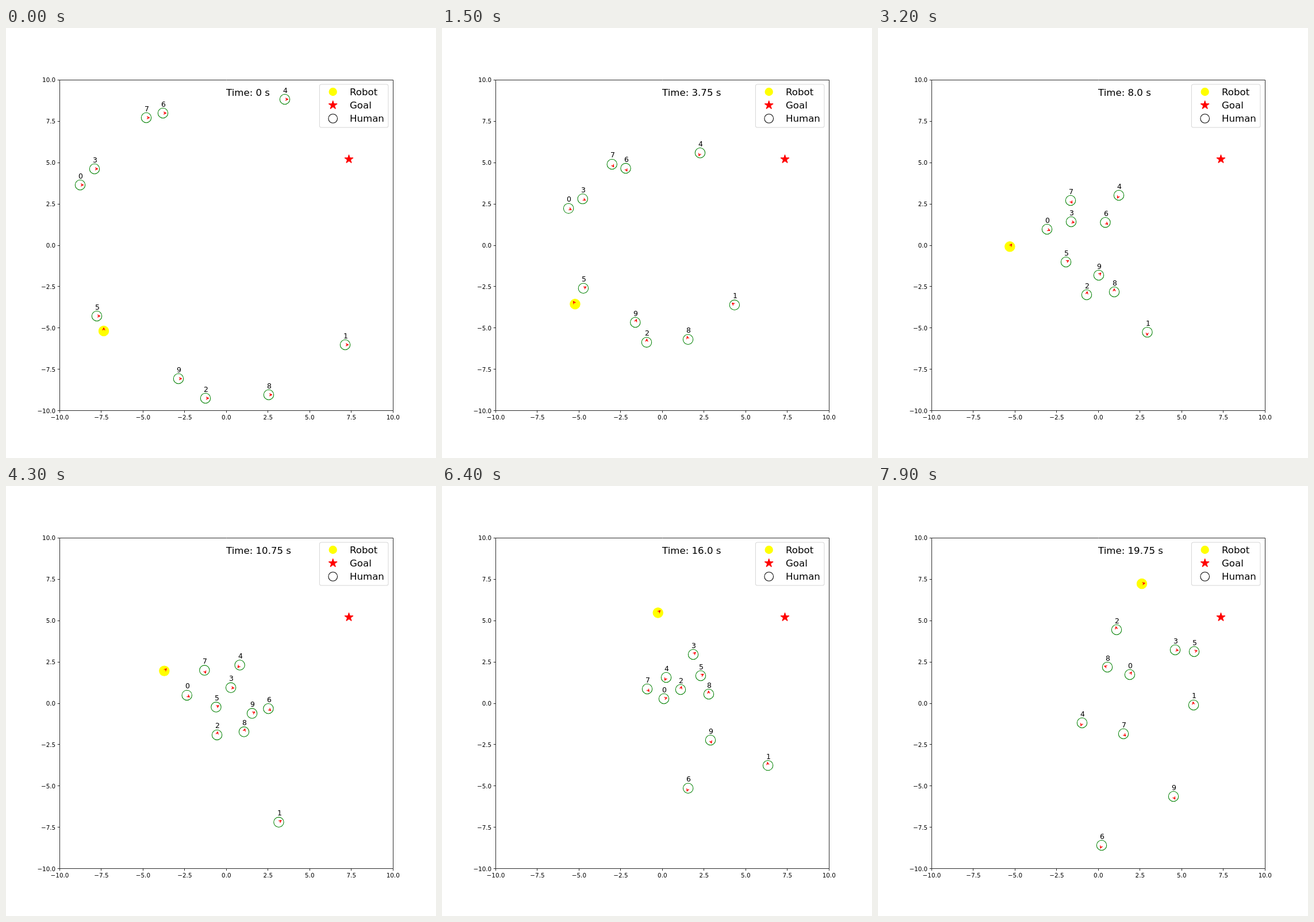
Recreate the animation shown at these times as an HTML page with a canvas. Size 748 by 748 pixels, loop 8 s.

```html
<!DOCTYPE html>
<html lang="en">
<head>
<meta charset="utf-8">
<title>Crowd navigation</title>
<style>
  html, body { margin: 0; width: 100%; height: 100%; overflow: hidden; background: #fff; }
  canvas { display: block; width: 748px; height: 748px; }
</style>
</head>
<body>
<canvas id="stage" width="748" height="748"></canvas>
<script>
const ctx = document.getElementById('stage').getContext('2d');
const STEP_MS = 100, STEPS = 80, LAST = STEPS - 1, DT = 0.25;
const PT = 748 / 720;             // one point in pixels
const TAU = 2 * Math.PI;
const UNIT = 28.985;              // pixels per axis unit
const BEATS = [0, 32, 52, 64, LAST];

const toX = v => 383.35 + UNIT * v;
const toY = v => 378 - 28.79 * v;

// Constant speed along straight legs, arriving at the last step
function walk(...points) {
  const legs = points.slice(1).map(([x, y], i) => {
    const [px, py] = points[i];
    return { px, py, length: Math.hypot(x - px, y - py), heading: Math.atan2(y - py, x - px) };
  });
  const total = legs.reduce((sum, leg) => sum + leg.length, 0);
  return step => {
    let s = total * step / LAST, i = 0;
    while (i < legs.length - 1 && s > legs[i].length) s -= legs[i++].length;
    const { px, py, heading } = legs[i];
    return { x: px + s * Math.cos(heading), y: py + s * Math.sin(heading), heading };
  };
}

// Smooth curve through the values at BEATS; returns value and slope
function spline(values, startSlope) {
  const n = values.length - 1;
  const gap = i => BEATS[i + 1] - BEATS[i];
  const rate = i => (values[i + 1] - values[i]) / gap(i);
  const slopes = [startSlope];
  for (let i = 1; i < n; i++) {
    slopes[i] = (rate(i - 1) * gap(i) + rate(i) * gap(i - 1)) / (gap(i - 1) + gap(i));
  }
  slopes[n] = 2 * rate(n - 1) - slopes[n - 1];
  return t => {
    let i = 0;
    while (i < n - 1 && t >= BEATS[i + 1]) i++;
    const h = gap(i), u = (t - BEATS[i]) / h;
    const a = slopes[i] * h, b = slopes[i + 1] * h, d = values[i + 1] - values[i];
    const c2 = 3 * d - 2 * a - b, c3 = a + b - 2 * d;
    return [values[i] + u * (a + u * (c2 + u * c3)), (a + u * (2 * c2 + 3 * u * c3)) / h];
  };
}

// Sets off for the centre at one unit per second, then weaves through the crowd
function weave(...points) {
  const [x0, y0] = points[0];
  const toCentre = Math.atan2(toY(0) - y0, toX(0) - x0), speed = UNIT * DT;
  const xAt = spline(points.map(p => p[0]), speed * Math.cos(toCentre));
  const yAt = spline(points.map(p => p[1]), speed * Math.sin(toCentre));
  return step => {
    const [x, vx] = xAt(step), [y, vy] = yAt(step);
    return { x, y, heading: Math.atan2(vy, vx) };
  };
}

const robot = walk([170, 527], [244, 499], [202, 436], [225, 386], [270, 327], [418, 178], [459, 170]);

const humans = [
  weave([129, 273], [294, 350], [334, 370], [386, 370], [438, 328]),
  walk([590, 551], [475, 453], [463, 593], [572, 515], [549, 381]),
  weave([347, 644], [363, 464], [378, 407], [415, 354], [415, 250]),
  weave([154, 245], [336, 337], [424, 344], [437, 293], [517, 285]),
  weave([485, 124], [419, 291], [399, 321], [390, 333], [355, 412]),
  weave([158, 501], [327, 407], [397, 365], [450, 330], [550, 288]),
  walk([273, 148], [320, 245], [394, 337], [466, 395], [460, 445], [389, 625]),
  weave([244, 156], [335, 300], [350, 333], [357, 353], [427, 431]),
  weave([457, 638], [411, 459], [427, 404], [464, 362], [399, 315]),
  weave([300, 610], [384, 430], [457, 392], [467, 442], [514, 540])
];

function text(str, x, y, points, align = 'left') {
  ctx.font = `${points * PT}px "DejaVu Sans", sans-serif`;
  ctx.textAlign = align;
  ctx.fillStyle = '#000';
  ctx.fillText(str, x, Math.round(y));
}

function line(x1, y1, x2, y2) {
  ctx.beginPath();
  ctx.moveTo(x1, y1);
  ctx.lineTo(x2, y2);
  ctx.stroke();
}

function circle(x, y, r, stroke, fill) {
  ctx.beginPath();
  ctx.arc(x, y, r, 0, TAU);
  if (fill) { ctx.fillStyle = fill; ctx.fill(); }
  if (stroke) { ctx.strokeStyle = stroke; ctx.lineWidth = PT; ctx.stroke(); }
}

function star(x, y) {
  ctx.beginPath();
  for (let i = 0; i < 10; i++) {
    const r = 7.5 * PT * (i % 2 ? 0.382 : 1), a = i * TAU / 10;
    ctx.lineTo(x + r * Math.sin(a), y - r * Math.cos(a));
  }
  ctx.closePath();
  ctx.lineJoin = 'bevel';
  ctx.lineWidth = PT;
  ctx.fillStyle = ctx.strokeStyle = '#f00';
  ctx.fill();
  ctx.stroke();
}

function arrow(x, y, heading) {
  const tip = 5.6, back = tip - 4 * PT, side = 2 * PT;
  ctx.save();
  ctx.translate(x, y);
  ctx.rotate(heading);
  ctx.strokeStyle = '#f00';
  ctx.lineWidth = PT;
  ctx.lineCap = ctx.lineJoin = 'round';
  ctx.beginPath();
  ctx.moveTo(2 * PT, 0);
  ctx.lineTo(tip, 0);
  ctx.moveTo(back, -side);
  ctx.lineTo(tip, 0);
  ctx.lineTo(back, side);
  ctx.stroke();
  ctx.restore();
}

function axes() {
  ctx.strokeStyle = '#000';
  ctx.lineWidth = 0.8 * PT;
  ctx.strokeRect(93.5, 90.5, 580, 575);
  for (let v = -10; v <= 10; v += 2.5) {
    const label = v.toFixed(1).replace('-', '\u2212');
    const x = Math.floor(toX(v)) + 0.5, y = Math.floor(toY(v)) + 0.5;
    line(x, 665.5, x, 669.3);
    line(89.7, y, 93.5, y);
    text(label, toX(v), 681, 10, 'center');
    text(label, 86.2, toY(v) + 3.8, 10, 'right');
  }
}

function legend() {
  ctx.beginPath();
  ctx.roundRect(545.4, 98, 119.6, 75, 3.3);
  ctx.fillStyle = '#fff';
  ctx.fill();
  ctx.strokeStyle = '#d6d6d6';
  ctx.lineWidth = PT;
  ctx.stroke();
  circle(568.7, 111, 7.2, null, '#ff0');
  star(568.7, 134.2);
  circle(568.7, 157.5, 7.5 * PT, '#000');
  ['Robot', 'Goal', 'Human'].forEach((name, i) => text(name, 598, 116.8 + 23.2 * i, 16));
}

function timeLabel(step) {
  const t = step * DT;
  return step && Number.isInteger(t) ? t.toFixed(1) : String(t);
}

function draw() {
  const step = Math.floor(performance.now() / STEP_MS) % STEPS;
  ctx.fillStyle = '#fff';
  ctx.fillRect(0, 0, 748, 748);

  const r = robot(step);
  circle(r.x, r.y, 8.7, '#ff0', '#ff0');
  star(596.5, 228.3);
  humans.forEach((human, i) => {
    const { x, y, heading } = human(step);
    circle(x, y, 8.7, '#008000');
    arrow(x, y, step ? heading : 0);
    text(i, Math.round(x - 2.9), y - 11.5, 12);
  });
  arrow(r.x, r.y, step ? r.heading : -TAU / 4);

  axes();
  text(`Time: ${timeLabel(step)} s`, 383, 118, 16);
  legend();
  requestAnimationFrame(draw);
}
draw();
</script>
</body>
</html>
```
